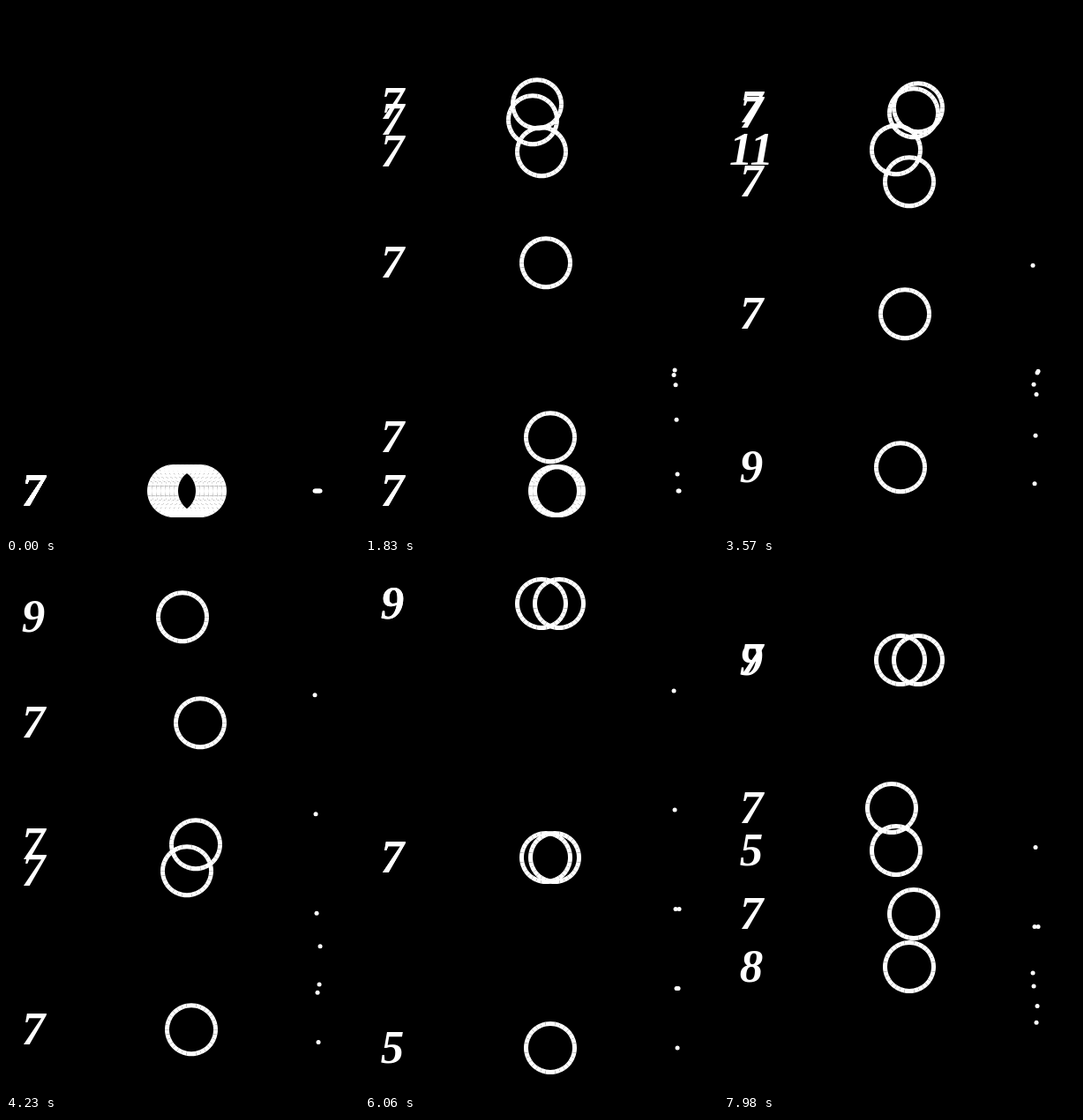
Write an HTML page with a canvas that moves like this. It is 400x600 px and loops after 8000 ms.

```html
<!DOCTYPE html>
<html lang="en">
<head>
<meta charset="utf-8">
<title>Juggling rings</title>
<style>
  html, body { margin: 0; width: 100%; height: 100%; overflow: hidden; background: #000; }
  canvas { display: block; }
</style>
</head>
<body>
<canvas id="stage" width="400" height="600"></canvas>
<script>
const ctx = document.getElementById('stage').getContext('2d');

const LOOP = 8000, TICK = 30, BEAT = 360, START = 300;
const FLOOR = 550, GRAVITY = 36, ZOOM = 3.2;
const BALLS = 7, SEGMENTS = 32;

// Siteswap: the value thrown on each beat
const throws = [7, 7, 7, 7, 7, 7, 7, 13, 11, 9, 7, 5, 3, 1, 9, 7, 5, 9, 7, 5, 7, 8];

// For each ball, its list of { beat, value }
const flights = Array.from({ length: BALLS }, () => []);
const landing = {};
throws.forEach((value, beat) => {
  const ball = beat < BALLS ? beat : landing[beat];
  flights[ball].push({ beat, value });
  landing[beat + value] = ball;
});

function pose(ball, now) {
  const list = flights[ball];
  const flight = list.filter(f => f.beat <= now).pop() || list[0];
  const u = Math.max(0, now - flight.beat);
  return { value: flight.value, height: GRAVITY * u * Math.max(0, flight.value - u) };
}

// Separate arcs leave the faint seams around the ring
function ring(x, y) {
  const step = Math.PI * 2 / SEGMENTS;
  for (let i = 0; i < SEGMENTS; i++) {
    ctx.beginPath();
    ctx.arc(x, y, 27.5, i * step, (i + 1) * step);
    ctx.stroke();
  }
}

function dot(x, y) {
  ctx.beginPath();
  ctx.arc(x, y, 2.5, 0, Math.PI * 2);
  ctx.fill();
}

function draw(time) {
  const now = (Math.floor(time / TICK) * TICK - START) / BEAT;
  ctx.fillStyle = '#000';
  ctx.fillRect(0, 0, 400, 600);
  ctx.fillStyle = ctx.strokeStyle = '#fff';
  ctx.lineWidth = 5;
  ctx.font = 'italic bold 53px "Liberation Serif", "Times New Roman", serif';
  ctx.textAlign = 'center';
  for (let i = 0; i < BALLS; i++) {
    const { value, height } = pose(i, now);
    const y = FLOOR - height;
    ring(190 + 5 * i, y);
    ctx.fillText(value, 31, y + 16.5);
    dot(350 + i, FLOOR - height / ZOOM);
  }
}

const begin = performance.now();
function frame() {
  draw((performance.now() - begin) % LOOP);
  requestAnimationFrame(frame);
}
frame();
</script>
</body>
</html>
```
